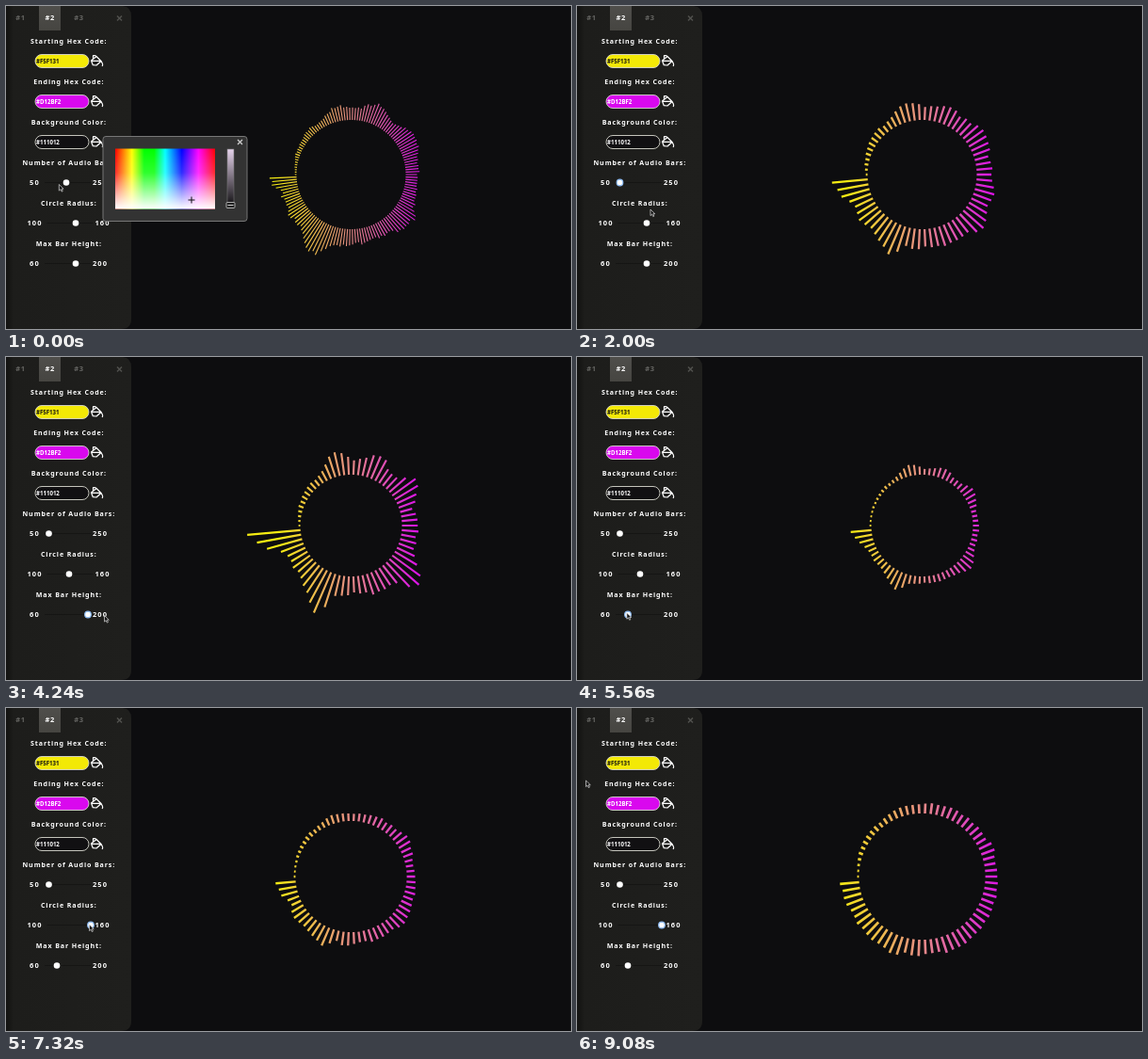
An HTML page with a canvas that plays this animation: 600x343 px, repeating every 9120 ms.

```html
<!DOCTYPE html>
<html lang="en">
<head>
<meta charset="utf-8">
<title>Audio circle controls</title>
<style>
  html, body { margin: 0; width: 100%; height: 100%; overflow: hidden; background: #0d0d0f; }
  canvas, svg { position: absolute; left: 0; top: 0; width: 600px; height: 343px; }
  text { font-family: "Noto Sans", "Open Sans", sans-serif; font-weight: 700; fill: #fff; }
  .label { font-size: 7.1px; letter-spacing: .87px; text-anchor: middle; }
  .value { font-size: 7.5px; letter-spacing: 1.1px; text-anchor: middle; }
  .hex { font-size: 6.1px; }
  .tab { font-size: 7.5px; letter-spacing: .8px; text-anchor: middle; fill: #666663; }
  .tab.on { fill: #fff; }
  .thumb { fill: #fff; stroke: none; }
  .thumb.focus { stroke: #8fbdf5; stroke-width: 1.2; }
  .icon { fill: none; stroke: #fff; stroke-width: 1.2; stroke-linejoin: round; stroke-linecap: round; }
</style>
</head>
<body>
<canvas id="bars"></canvas>
<svg viewBox="0 0 600 343">
  <defs>
    <linearGradient id="panelFill" x2="1" y2="0">
      <stop offset="0" stop-color="#121211"/>
      <stop offset=".06" stop-color="#1d1d1b"/>
      <stop offset="1" stop-color="#1f1f1d"/>
    </linearGradient>
    <linearGradient id="tabFill" x2="0" y2="1">
      <stop offset="0" stop-color="#4f4e4b"/>
      <stop offset="1" stop-color="#464541"/>
    </linearGradient>
    <linearGradient id="hues" x2="1" y2="0">
      <stop offset="0" stop-color="#f00"/>
      <stop offset=".167" stop-color="#ff0"/>
      <stop offset=".29" stop-color="#0f0"/>
      <stop offset=".39" stop-color="#0f0"/>
      <stop offset=".5" stop-color="#0ff"/>
      <stop offset=".667" stop-color="#00f"/>
      <stop offset=".833" stop-color="#f0f"/>
      <stop offset="1" stop-color="#f00"/>
    </linearGradient>
    <linearGradient id="fade" x2="0" y2="1">
      <stop offset="0" stop-color="#fff" stop-opacity="0"/>
      <stop offset=".4" stop-color="#fff" stop-opacity=".18"/>
      <stop offset="1" stop-color="#fff"/>
    </linearGradient>
    <linearGradient id="shade" x2="0" y2="1">
      <stop offset="0" stop-color="#e6d3ec"/>
      <stop offset="1" stop-color="#0c0b0d"/>
    </linearGradient>
  </defs>

  <path d="M0 0H124Q133 1 133 11V332Q133 343 122 343H0Z" fill="url(#panelFill)"/>
  <rect x="35" width="23" height="26" fill="url(#tabFill)"/>
  <text class="tab" x="15.5" y="15">#1</text>
  <text class="tab on" x="46.8" y="15">#2</text>
  <text class="tab" x="77.5" y="15">#3</text>
  <path d="M118 10.5l5 5m0-5l-5 5" stroke="#51514e" stroke-width="1.5"/>
  <g id="controls"></g>

  <g id="picker">
    <rect x="103" y="138.5" width="153" height="90" rx="3" fill="#333" stroke="#777"/>
    <path d="M246 142l5 5m0-5l-5 5" stroke="#ccc" stroke-width="1.3"/>
    <rect x="116" y="151.5" width="106" height="64" fill="url(#hues)"/>
    <rect x="116" y="151.5" width="106" height="64" fill="url(#fade)"/>
    <path d="M193.5 206h7m-3.5-3.5v7" stroke="#111"/>
    <rect x="235" y="152" width="7" height="61" fill="url(#shade)" stroke="#777" stroke-width=".6"/>
    <rect x="234" y="208.5" width="9" height="6" rx="1" fill="#222" stroke="#aaa"/>
    <path d="M235.500 211.500h6" stroke="#ccc"/>
  </g>

  <path id="cursor" d="M0 0V6.600L1.600 5.200L2.800 7.600L3.900 7.100L2.800 4.700H4.800Z"
    fill="#161616" stroke="#ddd" stroke-width=".7"/>
</svg>
<script>
const LOOP = 9120, STEP = 40;
const CX = 366.5, CY = 179;
const canvas = document.getElementById("bars");
const ctx = canvas.getContext("2d");
const picker = document.getElementById("picker");
const cursor = document.getElementById("cursor");
const scale = Math.max(1, window.devicePixelRatio || 1);
canvas.width = 600 * scale;
canvas.height = 343 * scale;

// Panel controls
const swatches = [
  ["Starting Hex Code:", "#F5F131", "#f3e906", "#111"],
  ["Ending Hex Code:", "#D12BF2", "#d908ee", "#fff"],
  ["Background Color:", "#111012", "#111012", "#fff"]
];
const sliders = [
  { name: "Number of Audio Bars:", low: 50, high: 250, at: 64, shift: 0 },
  { name: "Circle Radius:", low: 100, high: 160, at: 74, shift: 2.5 },
  { name: "Max Bar Height:", low: 60, high: 200, at: 74, shift: 0 }
];
const sliderY = i => 187.5 + 43 * i;
const label = (text, y) => `<text class="label" x="66.800" y="${y}">${text}</text>`;
const bucket = y => `<g class="icon" transform="translate(89.5 ${y - 7})">
  <path d="M1 6.500L6.500 2L11.500 7L6.500 11.500L2.800 11.200Z M1.500 6.800H11 M3 4V1.200H5.500"/>
  <path d="M11.800 7.500Q13.800 10.500 12.800 12"/></g>`;

let html = "";
swatches.forEach(([name, code, fill, ink], i) => {
  const y = 58.5 + 43 * i;
  html += label(name, y - 19) +
    `<rect x="31" y="${y - 7}" width="57" height="14" rx="7" fill="${fill}" stroke="#d8d8d0" stroke-width=".9"/>` +
    `<text class="hex" x="32" y="${y + 2.2}" style="fill:${ink}">${code}</text>` + bucket(y);
});
sliders.forEach(({ name, low, high, shift }, i) => {
  const y = sliderY(i);
  html += label(name, y - 19) +
    `<text class="value" x="30.500" y="${y + 2.8}">${low}</text>` +
    `<text class="value" x="${100 + shift}" y="${y + 2.8}">${high}</text>` +
    `<path d="M${41 + shift} ${y}h49" stroke="#151514"/>` +
    `<circle class="thumb" cy="${y}" r="3.300"/>`;
});
document.getElementById("controls").innerHTML = html;
const thumbs = document.querySelectorAll(".thumb");

const smooth = u => u * u * (3 - 2 * u);
const ease = (t, from, to) => smooth(Math.min(1, Math.max(0, (t - from) / (to - from))));
const mix = (a, b, u) => a + (b - a) * u;

// Eased value of rows [time, ...values]
function track(rows, t) {
  let i = 0;
  while (i < rows.length - 2 && t >= rows[i + 1][0]) i++;
  const u = ease(t, rows[i][0], rows[i + 1][0]);
  return rows[i].slice(1).map((v, k) => mix(v, rows[i + 1][k + 1], u));
}

// Slider drags; thumbs, focus and pointer all follow from these
const drags = [
  { slider: 0, from: 340, to: 1400, x: 45.5 },
  { slider: 1, from: 2240, to: 2640, x: 67 },
  { slider: 2, from: 3120, to: 3720, x: 87 },
  { slider: 2, from: 4400, to: 5400, x: 54 },
  { slider: 1, from: 6920, to: 7320, x: 90 }
];
const thumbX = (slider, t) => drags
  .filter(d => d.slider === slider)
  .reduce((x, d) => mix(x, d.x, ease(t, d.from, d.to)), sliders[slider].at);

const stops = [
  [0, 56.3, 189.5], [2000, 78, 216], [2880, 65.5, 268],
  [4240, 104.5, 274.5], [8200, 88, 230], [8900, 9.5, 77]
];
const route = drags
  .flatMap(d => [d.from, d.to].map(t => [t, thumbX(d.slider, t) - 1.5, sliderY(d.slider) - 0.5]))
  .concat(stops)
  .sort((a, b) => a[0] - b[0]);

// Sound: [time, floor, peak] levels over a falling spectrum with fixed tones
const levels = [
  [0, 19, 14], [2000, 24, 12], [2880, 32, 10], [4240, 23, 27],
  [5560, 9, 11], [7320, 14, 6], [9080, 18, 3]
];
const tones = [0, .17, .38, .59, .69, .78];
const rand = (a, b) => {
  const s = Math.sin(a * 127.1 + b * 311.7) * 43758.5453;
  return (s - Math.floor(s)) * 2 - 1;
};
function beat(band, t) {
  const k = Math.floor(t / 120);
  return mix(rand(band, k), rand(band, k + 1), smooth(t / 120 - k));
}
function barLength(i, count, t, [floor, peak]) {
  const x = i / (count - 1);
  const tone = tones.reduce((sum, p) => sum + Math.exp(-(((x - p) / .03) ** 2)), 0);
  const body = floor * Math.sqrt(1 - x) + peak * tone * (1 - .5 * x);
  return Math.max(1.8, body * (1 + .1 * rand(i, 3) + .15 * beat(Math.floor(x * 28), t)));
}

function drawBars(t) {
  const count = 70 + Math.round((thumbX(0, t) - 45.5) * 3.9);
  const radius = 54 + (thumbX(1, t - 230) - 67) * .57;
  const level = track(levels, t);
  const reach = radius + 22;
  ctx.setTransform(scale, 0, 0, scale, 0, 0);
  ctx.clearRect(0, 0, 600, 343);
  const paint = ctx.createLinearGradient(CX - reach, 0, CX + reach, 0);
  paint.addColorStop(0, "#f5ec12");
  paint.addColorStop(.5, "#e58a86");
  paint.addColorStop(1, "#d90cec");
  ctx.strokeStyle = paint;
  ctx.lineWidth = .88 * Math.PI * radius / count;
  ctx.beginPath();
  for (let i = 0; i < count; i++) {
    const end = radius + barLength(i, count, t, level);
    const angle = (i + 1) / count * Math.PI * 2;
    const dx = -Math.cos(angle), dy = Math.sin(angle);
    ctx.moveTo(CX + dx * radius, CY + dy * radius);
    ctx.lineTo(CX + dx * end, CY + dy * end);
  }
  ctx.stroke();
}

function draw(t) {
  const active = drags.filter(d => t >= d.from).pop();
  thumbs.forEach((thumb, i) => {
    thumb.setAttribute("cx", thumbX(i, t));
    thumb.classList.toggle("focus", !!active && active.slider === i);
  });
  drawBars(t);
  picker.style.display = active ? "none" : "";
  cursor.setAttribute("transform", `translate(${track(route, t).join(" ")})`);
}

const start = performance.now();
function tick() {
  const elapsed = (performance.now() - start) % LOOP;
  draw(Math.floor(elapsed / STEP) * STEP);
  requestAnimationFrame(tick);
}
tick();
</script>
</body>
</html>
```
